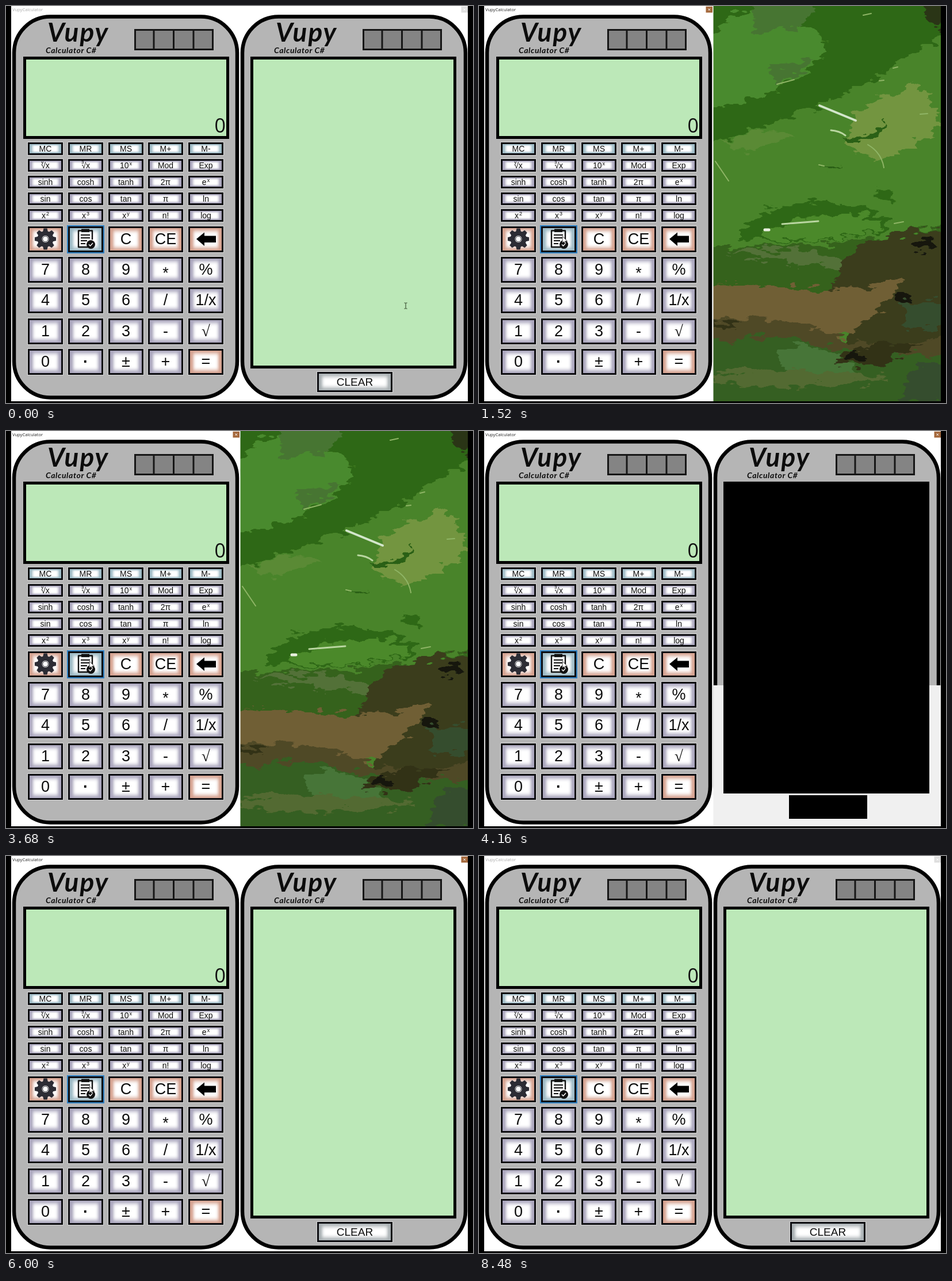
An HTML page that plays this animation: 812x690 px, repeating every 8560 ms.

```html
<!DOCTYPE html>
<html lang="en">
<head>
<meta charset="utf-8">
<title>Calculator</title>
<style>
html, body { margin: 0; width: 100%; height: 100%; overflow: hidden; background: #000; }
svg { position: absolute; left: 0; top: 0; }
.key {
  position: absolute; box-sizing: border-box; display: flex; align-items: center; justify-content: center;
  border: 3px solid #0c0c10; outline: 1px solid #dadada; background: #fff; color: #0c0c0c;
  font: 27px "Liberation Sans", Arial, sans-serif; white-space: pre;
  box-shadow: inset 0 0 6px 5px var(--tint), inset 5px 0 4px -1px var(--tint), inset -5px 0 4px -1px var(--tint);
}
.small {
  font-size: 14px;
  box-shadow: inset 0 0 3px 2px var(--tint), inset 6px 0 4px -1px var(--tint), inset -6px 0 4px -1px var(--tint);
}
.key sup { font-size: 9px; line-height: 1; align-self: flex-start; margin: 1px 0 0 1px; }
.key sup.root { font-size: 8px; margin: -1px -4px 0 0; }
.focus { outline: 2px solid #3184c6; }
#clear { left: 541px; top: 636px; width: 131px; height: 35px; font-size: 19px; --tint: #a9b0b3; }
</style>
</head>
<body>
<svg width="812" height="690">
  <defs>
    <filter id="rough" x="0" y="0" width="812" height="690" filterUnits="userSpaceOnUse">
      <feTurbulence type="fractalNoise" baseFrequency=".035 .08" numOctaves="3" seed="4"/>
      <feDisplacementMap in="SourceGraphic" scale="36" xChannelSelector="R" yChannelSelector="G"/>
    </filter>
    <clipPath id="desk"><path d="M407 0H803V687H407z"/></clipPath>
    <g id="shell">
      <rect x="14" y="18.5" width="388" height="662" rx="63" fill="#b5b5b5" stroke="#000" stroke-width="6.5"/>
    </g>
    <g id="brand" font-family="Lato, sans-serif" font-weight="bold" font-style="italic" fill="#0c0c0c">
      <text x="72" y="62" font-size="46" letter-spacing="2">Vupy</text>
      <text x="69" y="82" font-size="14" letter-spacing=".6">Calculator C#</text>
      <path d="M224.5 41.5H359.5V75.5H224.5zM257 41V76M291.5 41V76M326 41V76" fill="#848484" stroke="#161616" stroke-width="3"/>
    </g>
  </defs>

  <g id="wallpaper" clip-path="url(#desk)">
    <g filter="url(#rough)">
      <path d="M380 -30H840V720H380z" fill="#48842a"/>
      <path d="M380 245Q590 185 700 118T840 25V-30H380z" fill="#2f6714"/>
      <path d="M380 60Q450 -5 530 20T600 80Q540 165 380 180z" fill="#4a8a2d"/>
      <path d="M470 -20H600L560 35 480 50zM500 105L590 90 520 140z" fill="#477433"/>
      <path d="M765 -20H840V50L780 30z" fill="#2b3512"/>
      <path d="M650 185L760 130 800 190 790 225 690 270 640 240z" fill="#739540"/>
      <path d="M420 235L500 215 560 225 470 250z" fill="#5a8a35"/>
      <path d="M630 225Q690 235 700 200Q715 222 680 233T630 225zM588 278Q605 290 628 278Q612 297 588 278z" fill="#2c6112"/>
      <path d="M455 390Q510 335 600 340T715 385Q640 415 455 408z" fill="#2e6815"/>
      <path d="M490 397Q560 358 640 362T690 390Q620 410 490 405z" fill="#4b892b"/>
      <path d="M685 318L725 320 715 340 695 333z" fill="#2e6815"/>
      <path d="M380 415Q560 425 700 400T840 385V500H380z" fill="#34621a"/>
      <path d="M430 425Q540 415 620 440T560 450z" fill="#527139"/>
      <path d="M660 415Q730 385 840 390V610Q730 590 660 610L600 500z" fill="#3b3d1d"/>
      <path d="M380 485Q490 480 570 490T740 470Q690 560 600 580T380 540z" fill="#705f35"/>
      <path d="M380 545Q500 530 610 570T840 560V620Q600 600 380 610z" fill="#504927"/>
      <path d="M380 590Q500 560 600 590T840 600V720H380z" fill="#355f20"/>
      <path d="M520 600Q590 570 640 620T550 645z" fill="#467539"/>
      <path d="M620 620Q680 570 770 590L700 625zM400 545L460 550 420 565z" fill="#303118"/>
      <path d="M380 640Q500 625 660 640T450 662z" fill="#536a30"/>
      <path d="M740 515H840V560H740zM760 620H840V690H730z" fill="#344d2d"/>
      <g fill="#141710">
        <ellipse cx="775" cy="414" rx="17" ry="10"/>
        <ellipse cx="739" cy="507" rx="15" ry="9"/>
        <ellipse cx="655" cy="608" rx="12" ry="7"/>
      </g>
    </g>
    <g fill="none" stroke="#b9d6a0" stroke-linecap="round" stroke-width="2">
      <path d="M592 173L655 199" stroke="#d3e6cb" stroke-width="4"/>
      <path d="M612 216Q627 217 637 225M527 379L590 374" stroke-width="3"/>
      <path d="M518 136L548 128M668 16L682 13M696 130L704 129M767 188L780 187M720 108L728 106M591 276L600 278M676 241Q700 255 704 281M411 270L434 304M722 378L738 375" stroke="#8fb566"/>
      <path d="M497 389H504" stroke="#e8f0df" stroke-width="5"/>
    </g>
  </g>

  <path d="M9 0H407.5V687H9z" fill="#fff"/>
  <use href="#shell"/>
  <use href="#brand"/>
  <path d="M32.5 90.5H385.5V228.5H32.5z" fill="#bce8b8" stroke="#000" stroke-width="5"/>
  <text x="382" y="220" text-anchor="end" font-family="Open Sans, sans-serif" font-size="34" fill="#111">0</text>

  <g id="history">
    <path d="M407 0H803V687H407z" fill="#fff"/>
    <use href="#shell" x="397"/>
    <path id="unpainted" d="M407.5 442H803V687H407.5z" fill="#f0f0f0"/>
    <use href="#brand" x="397"/>
    <path id="paper" d="M427.5 90.5H780.5V627.5H427.5z" stroke="#000" stroke-width="5"/>
    <path id="clearGap" d="M539 633H675V674H539z"/>
  </g>

  <text id="caption" x="11" y="8.5" font-family="Open Sans, sans-serif" font-size="7.6">VupyCalculator</text>
  <g id="close">
    <path d="M0 1H11.5V11.5H0z"/>
    <path d="M4 4.5L7.5 8M7.5 4.5L4 8" stroke="#fff"/>
  </g>
</svg>

<div id="keys"></div>
<div id="clear" class="key">CLEAR</div>

<svg width="812" height="690">
  <g transform="translate(68.5 405)" fill="#2c2c34">
    <g id="teeth"></g>
    <circle r="10" fill="none" stroke="#2c2c34" stroke-width="8"/>
    <circle r="4.8" fill="#fff" stroke="#2c2c34"/>
  </g>
  <g fill="none" stroke="#111" stroke-width="2.4">
    <path d="M143 419H126V390.500H150V406" stroke-linejoin="round"/>
    <path d="M131 387.500H145V393H131z" fill="#111" stroke="none"/>
    <path d="M130 398H146M130 403H146M130 408H141M130 413H138" stroke-width="2"/>
    <circle cx="147.500" cy="414.500" r="7.500" fill="#111" stroke="none"/>
    <path d="M144 414.500L146.500 417 151 412" stroke="#fff" stroke-width="1.500"/>
  </g>
  <path d="M331 405L345 393.500V399.500H365V411H345V417z"/>
  <g id="cursor">
    <path id="arrow" d="M0 0V12L2.800 9.500 4.700 13.500 6.500 12.700 4.700 8.800H8.500z" fill="#fff" stroke="#222" stroke-width=".8"/>
    <path id="beam" d="M-2.500 -5H-.5L0 -4.500.5 -5H2.500M0 -4.500V4.500M-2.500 5H-.5L0 4.500.5 5H2.500" fill="none" stroke="#26391f"/>
  </g>
</svg>

<script>
const LOOP = 8560, STEP = 80;
const BLUE = '#9dbac5', LILAC = '#aaa6bd', SALMON = '#d5a290';
const $ = id => document.getElementById(id);
const show = (id, on) => $(id).style.display = on ? '' : 'none';
const sup = (base, power) => `${base}<sup>${power}</sup>`;
const root = degree => `<sup class="root">${degree}</sup>√x`;

const smallRows = [
  ['MC', 'MR', 'MS', 'M+', 'M-'],
  [root('y'), root(3), sup(10, 'x'), 'Mod', 'Exp'],
  ['sinh', 'cosh', 'tanh', '2π', sup('e', 'x')],
  ['sin', 'cos', 'tan', 'π', 'ln'],
  [sup('x', 2), sup('x', 3), sup('x', 'y'), 'n!', 'log']
];
const bigRows = [
  ['', '', 'C', 'CE', ''],
  ['7', '8', '9', '<span style="position:relative;top:6px">*</span>', '%'],
  ['4', '5', '6', '/', '1/x'],
  ['1', '2', '3', '-', '<span style="font-family:Liberation Serif,serif">√</span>'],
  ['0', '<b>·</b>', '±', '+', '=']
];

function addKey(label, col, top, height, tint, extra = '') {
  const style = `left:${Math.round(38 + 69.8 * col)}px;top:${top}px;width:61px;height:${height}px;--tint:${tint}`;
  $('keys').insertAdjacentHTML('beforeend', `<div class="key ${extra}" style="${style}">${label}</div>`);
}
smallRows.forEach((row, r) => row.forEach((label, c) =>
  addKey(label, c, 237 + 29 * r, 22, r ? LILAC : BLUE, 'small')));
bigRows.forEach((row, r) => row.forEach((label, c) => {
  const focused = !r && c === 1;
  const tint = focused ? BLUE : !r || label === '=' ? SALMON : LILAC;
  addKey(label, c, Math.round(382.6 + 53.4 * r), 45, tint, focused ? 'focus' : '');
}));
for (let a = 0; a < 360; a += 45)
  $('teeth').innerHTML += `<path d="M-4.500 -12L-3 -18.500H3L4.500 -12z" transform="rotate(${a})"/>`;

// Each click on the clipboard key folds or unfolds the history panel.
const toggles = [1200, 2320, 3200, 4080, 4960, 5840];
const REPAINT = 160;

// Pointer stops: time, x, y
const stops = [[0, 695, 521], [80, 695, 521], [960, 145, 400], [6400, 145, 400],
               [6800, 148, 391], [7360, 148, 391], [8240, 830, 480], [LOOP, 830, 480]];

function pointerAt(t) {
  const i = stops.findIndex(s => s[0] > t);
  const [t0, x0, y0] = stops[i - 1], [t1, x1, y1] = stops[i];
  const u = (t - t0) / (t1 - t0), e = u * u * (3 - 2 * u);
  return [x0 + (x1 - x0) * e, y0 + (y1 - y0) * e];
}

function draw() {
  const t = Math.floor(performance.now() % LOOP / STEP) * STEP;
  const past = toggles.filter(s => s <= t);
  const open = past.length % 2 === 0;
  const repainting = open && past.length > 0 && t - past[past.length - 1] < REPAINT;
  const active = t >= 1040 && t < 8280;

  show('history', open);
  show('unpainted', repainting);
  show('clearGap', repainting);
  show('clear', open && !repainting);
  $('paper').setAttribute('fill', repainting ? '#000' : '#bce8b8');
  $('caption').setAttribute('fill', active ? '#222' : '#aaa');
  $('close').setAttribute('transform', `translate(${open ? 791.5 : 394.5})`);
  $('close').setAttribute('fill', active ? '#a4683c' : '#dedede');

  const [x, y] = pointerAt(t);
  const overPaper = open && x > 430 && x < 778 && y > 93 && y < 625;
  $('cursor').setAttribute('transform', `translate(${x} ${y})`);
  show('beam', overPaper);
  show('arrow', !overPaper);
  requestAnimationFrame(draw);
}
draw();
</script>
</body>
</html>
```
